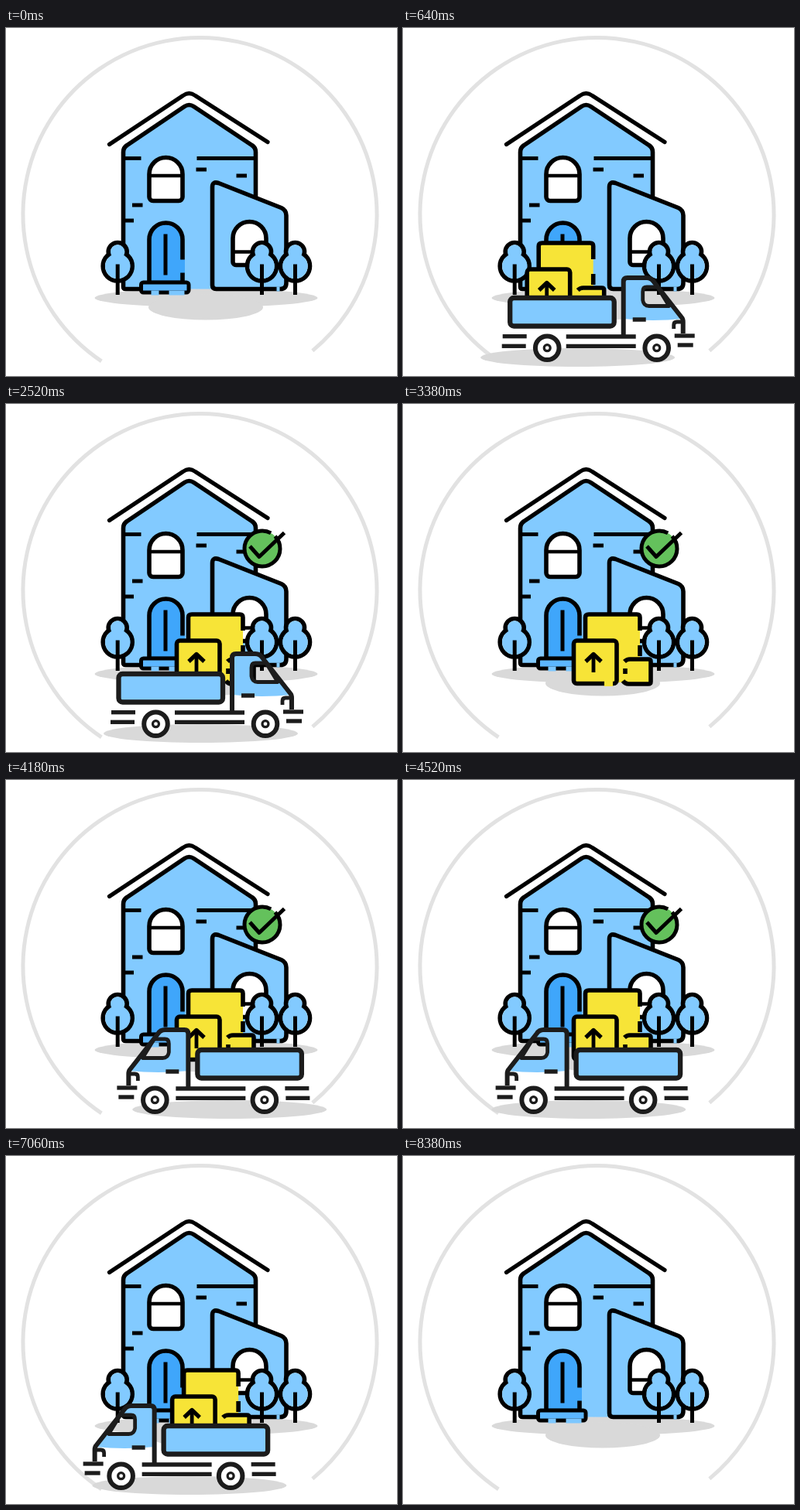
An HTML page with a canvas that plays this animation: 505x450 px, repeating every 8400 ms.

```html
<!DOCTYPE html>
<html lang="en">
<head>
<meta charset="utf-8">
<title>House move</title>
<style>
html, body { margin: 0; width: 100%; height: 100%; overflow: hidden; background: #fff; }
canvas { display: block; width: 505px; height: 450px; }
</style>
</head>
<body>
<canvas id="stage" width="505" height="450"></canvas>
<script>
const ctx = document.getElementById('stage').getContext('2d');
const LOOP = 8400;
const BLUE = '#82caff', DOOR = '#3fa6fb', YELLOW = '#f7e437', GREEN = '#64c15c';
const GREY = '#d9d9d9', RING = '#e2e2e2', INK = '#000', TRUCK_INK = '#1c1c1c';
const BOLD = 5.6;

const rad = deg => deg * Math.PI / 180;
const part = (t, a, b) => Math.min(1, Math.max(0, (t - a) / (b - a)));
const smooth = p => (1 - Math.cos(Math.PI * p)) / 2;
const mix = (a, b, p) => a + (b - a) * p;

function paint(path, fill, ink, width = BOLD) {
  if (fill) { ctx.fillStyle = fill; ctx.fill(path, 'evenodd'); }
  if (ink) { ctx.strokeStyle = ink; ctx.lineWidth = width; ctx.stroke(path); }
}
function line(ink, width, ...pts) {
  const p = new Path2D();
  for (let i = 0; i < pts.length; i += 2) p.lineTo(pts[i], pts[i + 1]);
  paint(p, null, ink, width);
}
function circle(x, y, r, fill, ink, width) {
  const p = new Path2D();
  p.arc(x, y, r, 0, 7);
  paint(p, fill, ink, width);
}
function ellipse(x, y, rx, ry) {
  const p = new Path2D();
  p.ellipse(x, y, rx, ry, 0, 0, 7);
  paint(p, GREY);
}
function box(x, y, w, h, r, fill, ink, width) {
  const p = new Path2D();
  p.roundRect(x, y, w, h, r);
  paint(p, fill, ink, width);
}
function arch(x, top, bottom, fill, r) {
  const p = new Path2D();
  p.moveTo(x - 21.5, top + 21.5);
  p.arc(x, top + 21.5, 21.5, Math.PI, 0);
  p.arcTo(x + 21.5, bottom, x, bottom, r);
  p.arcTo(x - 21.5, bottom, x - 21.5, top, r);
  p.closePath();
  paint(p, fill, INK);
}

function tree(x) {
  circle(x, 308.5, 19, null, INK, BOLD);
  circle(x, 290, 12, null, INK, BOLD);
  circle(x, 308.5, 16.2, BLUE);
  circle(x, 290, 9.2, BLUE);
  line(INK, 5, x, 306, x, 345.5);
}

function backdrop() {
  const ring = new Path2D();
  ring.arc(250.5, 241, 228.5, rad(123.8), rad(410.5));
  paint(ring, null, RING, 5);
  ellipse(258.5, 349, 144, 12);
  ellipse(258, 361, 74, 16.5);
}

function house() {
  ctx.save();
  ctx.translate(-0.5, -0.5);
  const body = new Path2D('M152 338V161Q152 155 157 152L231 102Q237 98 243 102L318 152Q323 155 323 161V338Z');
  paint(body, BLUE);
  paint(new Path2D('M175 338H155Q152 338 152 335V161Q152 155 157 152L231 102Q237 98 243 102L318 152Q323 155 323 161V219'), null, INK);
  ctx.lineCap = 'round';
  paint(new Path2D('M134 151L229 88Q237 82 245 88L338.5 148'), null, INK, 5.2);
  ctx.lineCap = 'butt';
  line(INK, 4.8, 152, 169, 175, 169);
  line(INK, 4.8, 247, 169, 322, 169);
  for (const [x, y] of [[246, 183.5], [298, 191.5], [163.5, 229.5], [152, 249.5]]) line(INK, 5, x, y, x + 13.5, y);

  arch(207, 168, 224, '#fff', 5);
  line(INK, 4.5, 185, 191.5, 229, 191.5);

  arch(207, 252.5, 330, DOOR, 0);
  line(DOOR, 6, 228.5, 300, 228.5, 317);
  line(INK, 5, 206.5, 267, 206.5, 320);
  box(175, 329.5, 61.5, 13, 3, '#5cb6ff', INK, 5);
  line('#7cc7ff', 6, 188, 343, 198, 343);
  line('#7cc7ff', 6, 211, 343, 231, 343);

  const annex = new Path2D('M267 331V206Q267 198.5 275 201L356 233Q362.5 236 362.5 243V330Q362.5 338 355 338H272Q267 338 267 333Z');
  paint(annex, BLUE, INK);
  line(BLUE, 6, 350, 338, 354, 338);
  arch(315, 251, 307, '#fff', 4);
  line(INK, 4.5, 293, 290, 337, 290);

  [144.7, 331, 374].forEach(tree);
  ctx.restore();
}

function parcels(dx, dy) {
  ctx.save();
  ctx.translate(dx, dy);
  box(235.5, 272, 70.5, 88, 4, YELLOW);
  paint(new Path2D('M235.5 308V276Q235.5 272 240 272H302Q306 272 306 276V293M306 312V326'), null, INK);
  box(287, 330, 33, 32, 3, YELLOW);
  paint(new Path2D('M286 333Q289 330 293 330H317Q320 330 320 333V359Q320 362 317 362H291Q287 362 284 358M287 342V349'), null, INK);
  box(220.5, 306, 55.5, 55.5, 4, YELLOW, INK, BOLD);
  line(YELLOW, 7, 260, 361.5, 271, 361.5);
  line(INK, 4.8, 246, 347, 246, 324);
  line(INK, 5.2, 236, 333, 246, 323.5, 256, 333);
  ctx.restore();
}

function wheel(x) {
  circle(x, 413.7, 15.3, '#fff', TRUCK_INK, 6);
  circle(x, 413.7, 4, '#fff', TRUCK_INK, 3.2);
}

function truck(dx, flip) {
  ctx.save();
  ctx.translate(dx, 0);
  if (flip) { ctx.translate(510, 0); ctx.scale(-1, 1); }

  const glass = 'M322 335H336L351 359.5H325Q318 359.5 317 352V341Q317 335 322 335Z';
  paint(new Path2D('M292 376V328Q292 323 297 323H322Q328 323 331 328L369 376Q330 380 292 376Z' + glass), BLUE);
  paint(new Path2D(glass), null, TRUCK_INK, 4.8);
  paint(new Path2D('M292 397V328Q292 323 297 323H322Q328 323 331 328L367 374Q369 376 369 380V395'), null, TRUCK_INK, 6);
  paint(new Path2D('M357 389V384Q357 380 361 380H369'), null, TRUCK_INK, 4.8);
  line(TRUCK_INK, 5.5, 304, 377, 321, 377);

  box(145.5, 349, 134.5, 36.5, 5, BLUE, TRUCK_INK, 6.3);

  for (const [a, b, y] of [[136, 167, 398.7], [135, 166, 411.3], [218, 308, 399], [218, 308, 411.3], [358, 384, 398], [362, 382, 410]])
    line(TRUCK_INK, 5.3, a, y, b, y);
  wheel(193.5);
  wheel(335);
  ctx.restore();
}

function badge(scale) {
  if (scale <= 0) return;
  ctx.save();
  ctx.translate(331, 187);
  ctx.scale(scale, scale);
  circle(0, 0, 23, GREEN);
  const rim = new Path2D();
  rim.arc(0, 0, 23, rad(-44), rad(299));
  paint(rim, null, INK, 5);
  line(INK, 5, -16, -3, -4, 10.5, 28.5, -20.5);
  ctx.restore();
}

// Drive in, run past the stop by 27 px, roll back.
function arrive(t, start, peak) {
  if (t < peak) return mix(-400, 27, smooth(part(t, start, peak)));
  return 27 * (1 - smooth(part(t, peak, peak + 260)));
}
const leave = (t, a, b) => 400 * part(t, a, b) ** 2.4;

const isBack = t => t > 3400;
const drive = t => isBack(t)
  ? -arrive(t, 3560, 4345) - leave(t, 6900, 7400)
  : arrive(t, 20, 780) + leave(t, 2620, 3180);

function draw(t) {
  ctx.clearRect(0, 0, 505, 450);
  ctx.lineJoin = 'round';
  backdrop();
  house();

  const back = isBack(t);
  const shift = drive(t);
  const unload = smooth(part(t, 1200, 1740));
  const load = smooth(part(t, 4760, 5300));

  const pop = part(t, 1800, 2150) - 1;
  const grow = pop <= -1 ? 0 : 1 + 2.7 * pop ** 3 + 1.7 * pop ** 2;
  badge(grow * (1 - smooth(part(t, 6060, 6360))));

  if (t < 7400) {
    const dx = back ? (20.5 + shift) * load : (shift - 53) * (1 - unload);
    parcels(dx, back ? 5 * load : 6 * (1 - unload));
  }
  // The shadow trails the truck slightly.
  ellipse(251.5 + drive(t - 35), 426, 125.5, 12);
  if (Math.abs(shift) < 399) truck(shift, back);
}

const begin = performance.now();
function tick() {
  draw((performance.now() - begin) % LOOP);
  requestAnimationFrame(tick);
}
tick();
</script>
</body>
</html>
```
